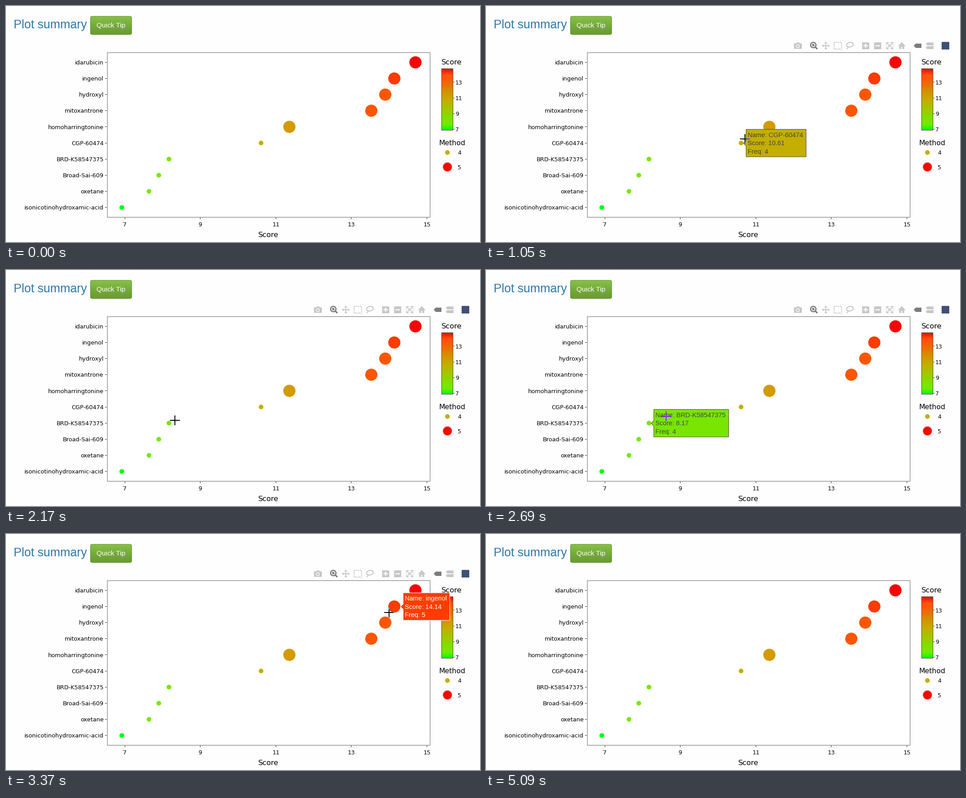
Recreate the animation shown at these times as a matplotlib script. Size 1058 px wide and 529 px high, loop 5980 ms.

```python
import numpy as np
import matplotlib.pyplot as plt
from matplotlib.animation import FuncAnimation
from matplotlib.patches import Circle, Ellipse, FancyBboxPatch, Polygon, Rectangle

W, H, DPI = 1058, 529, 64
LOOP, INTERVAL = 5980, 20
PX = 72 / DPI  # points per pixel

SANS, ARIAL = "DejaVu Sans", "Liberation Sans"
LIGHT, ACTIVE, DARK, PAPER = "#c7c7c7", "#7c7c7c", "#444444", "#fefefe"

COMPOUNDS = [
    ("idarubicin", 14.70, 5), ("ingenol", 14.14, 5), ("hydroxyl", 13.90, 5),
    ("mitoxantrone", 13.53, 5), ("homoharringtonine", 11.36, 5),
    ("CGP-60474", 10.61, 4), ("BRD-K58547375", 8.17, 4),
    ("Broad-Sai-609", 7.90, 4), ("oxetane", 7.64, 4),
    ("isonicotinohydroxamic-acid", 6.92, 4),
]
RADIUS = {4: 5.2, 5: 13.6}


def smooth(u):
    return u * u * (3 - 2 * u)


def ease_out(u):
    return 1 - (1 - u) ** 3


# start ms, end ms, steps, target x, target y, easing
ENTRY = (549, 545)
MOVES = [
    (250, 760, 10, 575, 300, smooth),
    (1050, 1380, 6, 622, 269, smooth),
    (1560, 1560, 1, 623, 269, smooth),
    (2030, 2260, 6, 368, 340, ease_out),
    (2690, 3030, 6, 827, 174, smooth),
    (3096, 3096, 1, 835, 163, smooth),
    (3162, 3280, 3, 854, 181, smooth),
    (3370, 3370, 1, 855, 176, smooth),
    (4420, 4420, 1, 833, 212, smooth),
    (4491, 4846, 6, 535, 545, smooth),
]

# start ms, end ms, compound index
HOVERS = [(700, 1180, 5), (1250, 2076, 4), (2215, 2755, 6),
          (3228, 3370, 2), (3370, 4491, 1)]


def score_color(score):
    stops = [6.92, 7.64, 7.9, 10.61, 11.36, 13.53, 13.9, 14.14, 14.7]
    red = np.interp(score, stops, [0, 112, 112, 196, 211, 251, 251, 255, 255])
    green = np.interp(score, stops, [255, 236, 236, 174, 154, 86, 86, 60, 0])
    return red / 255, green / 255, 0.0


def invert(color):
    return tuple(1 - c for c in color)


def score_x(score):
    return 265.2 + (score - 7) * 84.25


def row_y(row):
    return 126.3 + 36.14 * row


def pixel_center(v):
    return np.floor(v) + 0.5


plt.rcParams["path.snap"] = False
fig = plt.figure(figsize=(W / DPI, H / DPI), dpi=DPI, facecolor=PAPER)
ax = fig.add_axes([0, 0, 1, 1])
ax.set(xlim=(0, W), ylim=(H, 0))
ax.axis("off")


def text(x, y, s, size, color="black", font=SANS, ha="left", va="baseline", z=4):
    return ax.text(x, y, s, fontsize=size * PX, color=color, family=font,
                   ha=ha, va=va, zorder=z)


def line(xs, ys, color, width, z=4, **kw):
    kw.setdefault("solid_capstyle", "butt")
    return ax.plot(xs, ys, color=color, lw=width * PX, zorder=z, **kw)[0]


def shape(patch, fill="none", edge="none", width=0, z=4):
    patch.set(facecolor=fill, edgecolor=edge, linewidth=width * PX, zorder=z)
    return ax.add_patch(patch)


def box(x0, y0, x1, y1, fill="none", edge="none", width=0, z=4):
    return shape(Rectangle((x0, y0), x1 - x0, y1 - y0), fill, edge, width, z)


def poly(points, fill, z=4):
    return shape(Polygon(points), fill, z=z)


def gradient(x0, y0, x1, y1, colors, z):
    return ax.imshow(np.array(colors)[:, None, :], extent=(x0, x1, y1, y0),
                     aspect="auto", interpolation="bilinear", zorder=z)


def draw_header():
    text(17, 50, "Plot summary", 26.7, "#2a79ad", ARIAL)
    stops = [0, 0.6, 1]
    u = np.linspace(0, 1, 42)
    ramp = np.stack([np.interp(u, stops, np.array(c) / 255) for c in
                     ((136, 115, 105), (193, 168, 153), (73, 57, 52))], axis=1)
    button = FancyBboxPatch((188.5, 23), 92, 41,
                            boxstyle="round,pad=0,rounding_size=4")
    shape(button, edge="#618c30", width=1, z=3)
    gradient(188, 22, 281, 65, ramp, 2).set_clip_path(button)
    text(202, 48, "Quick Tip", 15.4, "white", ARIAL)


def draw_plot():
    box(226.3, 104.5, 946.6, 473.5, "white", "#707070", 1.1, z=1)
    for value in range(7, 16, 2):
        x = pixel_center(score_x(value))
        line([x, x], [474, 478], "#333333", 1)
        text(x, 494, str(value), 12.9, ha="center")
    text(586, 518, "Score", 16.2, ha="center")

    dots = []
    for row, (name, score, freq) in enumerate(COMPOUNDS):
        y = row_y(row)
        line([221, 225], [pixel_center(y)] * 2, "#333333", 1)
        text(218, y + 4.7, name, 12.9, ha="right")
        dot = Circle((score_x(score), y), RADIUS[freq])
        dots.append(shape(dot, score_color(score), z=3))
    return dots


def draw_legend():
    text(972, 131, "Score", 16.2)
    levels = np.linspace(14.7, 6.92, 138)
    gradient(972, 141, 998, 278.5, [score_color(s) for s in levels], 2)
    box(972.3, 140.6, 997.7, 278.4, edge="#444444", width=1)
    for value in (13, 11, 9, 7):
        y = 276.5 - (value - 7) * 17.6
        line([998, 1001.5], [pixel_center(y)] * 2, "#444444", 1)
        text(1003, y + 4.7, str(value), 12.5)
    text(966, 312, "Method", 15.8)
    shape(Circle((985.3, 328.4), 5.2), score_color(10.61))
    shape(Circle((985.3, 360.8), 10), "red")
    text(1008, 333.2, "4", 12.5)
    text(1008, 365.7, "5", 12.5)


def draw_toolbar():
    cy = 89
    # camera
    box(687.5, 84, 705, 96, LIGHT)
    box(692.5, 82, 700, 84.5, LIGHT)
    shape(Circle((696.3, 89.8), 4.2), PAPER)
    shape(Circle((696.3, 89.8), 2.6), LIGHT)
    # magnifier
    shape(Circle((730.5, 87.5), 6), edge=ACTIVE, width=2.6)
    box(728, 85, 733, 90, ACTIVE)
    line([735, 739.5], [92, 96.5], ACTIVE, 3.4)
    # pan
    line([752, 765], [cy, cy], LIGHT, 2)
    line([758.5, 758.5], [82, 96], LIGHT, 2)
    for dx, dy in ((1, 0), (-1, 0), (0, 1), (0, -1)):
        tip = np.array([758.5 + 9 * dx, cy + 9 * dy])
        back, side = np.array([dx, dy]) * 4, np.array([dy, dx]) * 3.5
        poly([tip, tip - back + side, tip - back - side], LIGHT)
    # box select
    line([777, 793.5, 793.5, 777, 777], [81.5, 81.5, 96.5, 96.5, 81.5],
         LIGHT, 2.2, linestyle=(0, (1.2, 0.8)), dash_capstyle="butt")
    # lasso
    shape(Ellipse((812.3, 86.8), 15.5, 10, angle=-12), edge=LIGHT, width=2)
    line([806, 808.5, 807.5, 804.5], [90.5, 92.5, 95, 96], LIGHT, 1.8)
    # zoom in and out
    for cx, sign in ((847.5, "+"), (874.3, "-")):
        box(cx - 8, 81.5, cx + 8, 97, LIGHT)
        line([cx - 5, cx + 5], [cy, cy], PAPER, 2.4)
        if sign == "+":
            line([cx, cx], [cy - 5, cy + 5], PAPER, 2.4)
    # autoscale
    box(893.5, 81.5, 908.5, 96.5, edge=LIGHT, width=0.8)
    for dx in (-1, 1):
        line([901 - 6 * dx, 901 + 6 * dx], [cy - 6, cy + 6], LIGHT, 2)
        for dy in (-1, 1):
            x, y = 901 + 8 * dx, cy + 8 * dy
            poly([(x, y), (x - 5.5 * dx, y), (x, y - 5.5 * dy)], LIGHT)
    # home
    poly([(919.5, 90), (928, 81), (936.5, 90)], LIGHT)
    box(922.5, 88.5, 933.5, 96.5, LIGHT)
    box(926.7, 91.5, 929.5, 96.5, PAPER)
    # hover tags
    poly([(954.5, cy), (959.5, 84.3), (972, 84.3), (972, 94), (959.5, 94)], ACTIVE)
    for y in (85, 93.3):
        poly([(981.5, y), (985, y - 3.3), (999, y - 3.3),
              (999, y + 3.3), (985, y + 3.3)], LIGHT)
    box(1017, 80.5, 1034, 97.5, "#3f4f75")
    return box(680, 78, 1040, 101, PAPER, z=5)


draw_header()
dots = draw_plot()
draw_legend()
toolbar_cover = draw_toolbar()

bubble = shape(Polygon([(0, 0), (1, 0), (1, 1)]), width=1, z=6)
bubble_lines = [text(0, 0, "", 14.45, font=ARIAL, z=7) for _ in range(3)]

# The pointer inverts whatever lies beneath it.
pointer = line([], [], "black", 2, z=8)
dot_pointers = []
for dot in dots:
    overlay = line([], [], invert(dot.get_facecolor()[:3]), 2, z=9)
    overlay.set_clip_path(dot)
    dot_pointers.append(overlay)
bubble_pointer = line([], [], "black", 2, z=10)


def pointer_position(t):
    x, y = ENTRY
    for start, end, steps, tx, ty, ease in MOVES:
        if t < start:
            break
        u = 1.0
        if t < end:
            u = (int((t - start) / (end - start) * (steps - 1)) + 1) / steps
        x, y = x + (tx - x) * ease(u), y + (ty - y) * ease(u)
    return round(x), round(y)


def show_bubble(index):
    name, score, freq = COMPOUNDS[index]
    color = score_color(score)
    bright = 0.299 * color[0] + 0.587 * color[1] >= 0.5
    ink = DARK if bright else "white"
    cy = row_y(index) + 0.4
    tip = score_x(score) + RADIUS[freq]
    left = pixel_center(tip + 6)
    rows = (f"Name: {name}", f"Score: {score:.2f}", f"Freq: {freq}")
    for i, (label, content) in enumerate(zip(bubble_lines, rows)):
        label.set(text=content, color=ink, position=(left + 3.3, cy - 13.8 + 18.7 * i))
    right = pixel_center(left + bubble_lines[0].get_window_extent().width + 10)
    bubble.set_xy([(tip, cy), (left, cy - 6), (left, cy - 31), (right, cy - 31),
                   (right, cy + 30.6), (left, cy + 30.6), (left, cy + 6)])
    bubble.set(facecolor=color, edgecolor=ink)
    bubble_pointer.set_color(invert(color))
    bubble_pointer.set_clip_path(bubble)


def update(frame):
    t = (frame + 0.5) * INTERVAL
    x, y = pointer_position(t)
    xs, ys = [x - 11, x + 11, np.nan, x, x], [y, y, np.nan, y - 11, y + 11]
    for cross in (pointer, bubble_pointer, *dot_pointers):
        cross.set_data(xs, ys)

    active = next((i for start, end, i in HOVERS if start <= t < end), None)
    for artist in (bubble, bubble_pointer, *bubble_lines):
        artist.set_visible(active is not None)
    if active is not None:
        show_bubble(active)

    toolbar_cover.set_alpha(np.interp(t, [300, 600, 4780, 5060], [1, 0, 0, 1]))
    return []


anim = FuncAnimation(fig, update, frames=LOOP // INTERVAL, interval=INTERVAL,
                     repeat=True, repeat_delay=0, blit=False)
plt.show()
```
